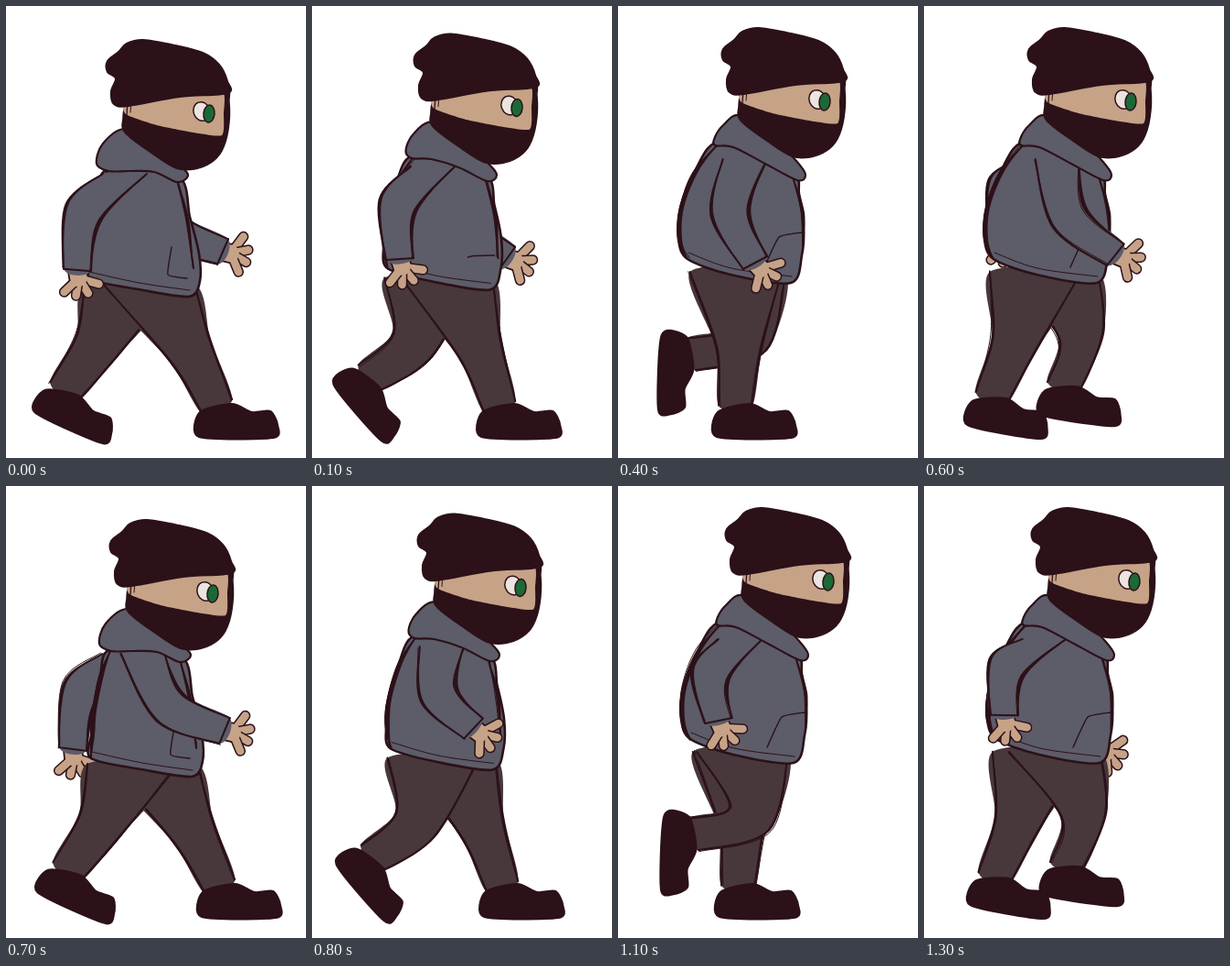
An HTML page with a canvas for the animation above (1.4 s loop, 328x493 px).

```html
<!DOCTYPE html>
<html lang="en">
<head>
<meta charset="utf-8">
<title>Walk cycle</title>
<style>
html, body { margin: 0; width: 100%; height: 100%; overflow: hidden; background: #fff; }
canvas { display: block; width: 328px; height: 493px; }
</style>
</head>
<body>
<canvas id="stage"></canvas>
<script>
const W = 328, H = 493, STEP = 100, COUNT = 14, HALF = COUNT / 2;
const DARK = '#2c1118', COAT = '#5d5c69', PANTS = '#48383b', SKIN = '#c6a287', GREEN = '#1b6936';
const canvas = document.getElementById('stage'), g = canvas.getContext('2d');
const ratio = window.devicePixelRatio || 1;
canvas.width = W * ratio;
canvas.height = H * ratio;

// ---- helpers ----
const rad = deg => deg * Math.PI / 180;
const pts = s => s.split(' ').map(p => p.split(',').map(Number));
const lerp = (a, b, u) => a.map((v, i) => v + (b[i] - v) * u);
const mix = (p, q, u) => p.map((v, i) => lerp(v, q[i], u));
const move = (p, dx, dy) => p.map(([x, y]) => [x + dx, y + dy]);

// Looping linear track through "step: values" keys.
function track(keys) {
  const steps = Object.keys(keys).map(Number);
  return t => {
    t %= COUNT;
    const a = steps.filter(s => s <= t).pop();
    const b = steps.find(s => s > t) ?? COUNT;
    return lerp(keys[a], keys[b % COUNT], (t - a) / (b - a));
  };
}

let seed = 1;
function random() {
  seed = (seed * 16807) % 2147483647;
  return seed / 2147483647;
}

// ---- motion ----
// Ankle x, y and foot tilt: planted for six steps, then lifted and swung forward.
const ankleAt = track({
  0: [231, 437, 0], 4: [128, 437, 0], 6: [73, 428, 10], 7: [63, 421, 24],
  9: [60, 391, 74], 11: [80, 380, 92], 13: [152, 416, 8]
});
const nearWrist = track({
  0: [78, 288], 2: [114, 264], 4: [150, 280], 7: [239, 267], 9: [114, 262], 11: [110, 256], 13: [88, 250]
});
const farWrist = track({
  0: [237, 268], 2: [190, 282], 4: [130, 262], 6: [86, 252], 7: [73, 287], 9: [191, 282], 11: [150, 262], 13: [191, 286]
});

// ---- shapes: leaning into the stride, and upright ----
const TORSO = [
  pts('112,178 100,206 92,245 90,272 90,297 145,309 200,317 212,300 211,270 201,230 188,185'),
  pts('112,148 84,180 68,220 66,254 76,276 123,293 189,302 201,272 203,238 198,205 190,181')
];
const HOOD = [
  pts('112,180 99,172 106,150 130,134 160,150 190,174 199,185 187,192 162,181 135,180'),
  pts('106,152 106,143 115,130 133,119 166,140 195,169 205,184 196,190 161,172 126,154')
];
const ZIP = [pts('186,184 197,232 205,286'), pts('191,186 201,225 202,264')];
const POCKET = [pts('181,263 177,293 198,297'), pts('160,285 176,252 201,247')];
const HAT = pts('118,107 115,93 120,79 111,72 111,60 123,50 132,41 150,37 185,43 215,51 233,64 242,82 242,95 190,99 134,109');
const MASK = pts('130,108 134,96 180,80 238,86 244,105 243,135 236,158 224,171 206,178 186,177 160,161 130,138 128,122');
const FACE = pts('131,103 185,93 236,92 238,118 236,141 205,138 165,130 131,118');
const SHOE = pts('-20,33 -19,6 16,-3 38,6 58,5 66,20 61,34');

// ---- drawing ----
// Smooth curve through points; a larger k gives tighter corners.
function trace(p, closed, k = 6) {
  const n = p.length, at = i => closed ? p[(i + n) % n] : p[Math.max(0, Math.min(n - 1, i))];
  g.moveTo(...p[0]);
  for (let i = 0; i < (closed ? n : n - 1); i++) {
    const [a, b, c, d] = [at(i - 1), at(i), at(i + 1), at(i + 2)];
    g.bezierCurveTo(b[0] + (c[0] - a[0]) / k, b[1] + (c[1] - a[1]) / k,
      c[0] - (d[0] - b[0]) / k, c[1] - (d[1] - b[1]) / k, ...c);
  }
}

function line(p, w = 2, color = DARK, closed = false, k = 6) {
  g.beginPath();
  trace(p, closed, k);
  g.strokeStyle = color;
  g.lineWidth = w;
  g.stroke();
}

function shape(p, color, w = 2.2, k = 7) {
  g.beginPath();
  trace(p, true, k);
  g.fillStyle = color;
  g.fill();
  if (w) line(p, w, DARK, true, k);
}

// Line that swells in the middle, with a loose second pass.
function brush(p, w) {
  const last = p.length - 1;
  const back = p.map(([x, y], i) => [x + (i && i < last ? w : 0), y]).reverse();
  g.beginPath();
  trace(p);
  g.lineTo(...back[0]);
  trace(back);
  g.fillStyle = DARK;
  g.fill();
  line(p, 2);
  line(p.map(([x, y]) => [x + random() * 4 - 2, y + random() * 4 - 2]), 1);
}

// Back and front edges of a limb through three joints, starting straight down.
function edges([a, b, c], widths) {
  const dirs = [[0, 1], [c[0] - a[0], c[1] - a[1]], [c[0] - b[0], c[1] - b[1]]];
  const side = s => [a, b, c].map(([x, y], i) => {
    const [dx, dy] = dirs[i], r = s * widths[i] / Math.hypot(dx, dy);
    return [x - dy * r, y + dx * r];
  });
  return [side(1), side(-1)];
}

// Joint between a and b, at fraction u and pushed sideways.
function joint(a, b, u, push) {
  const dx = b[0] - a[0], dy = b[1] - a[1], d = Math.hypot(dx, dy);
  return [a[0] + dx * u + dy / d * push, a[1] + dy * u - dx / d * push];
}

function leg(phase, lean) {
  const [x, y, tilt] = ankleAt(phase);
  const center = lerp([131, 290], [146, 303], lean);
  const hip = [center[0] + 10 * Math.cos(phase / COUNT * Math.PI * 2), center[1]];
  const half = Math.hypot(x - hip[0], y - hip[1]) / 2;
  const bend = Math.sqrt(Math.max(16, 68 ** 2 - half ** 2));
  const [back, front] = edges([hip, joint(hip, [x, y], .56, bend), [x, y]], [50, 25, 18]);
  shape([...back, ...front.reverse()], PANTS, 0, 8);
  brush(back, 2);
  brush(front, -2);
  g.save();
  g.translate(x, y);
  g.rotate(rad(tilt));
  shape(SHOE, DARK, 2, 8);
  g.restore();
}

// The fingers fan out, pointing down behind the body and ahead in front of it.
function hand([x, y]) {
  const aim = Math.max(12, 80 - .45 * (x - 80));
  const reach = (deg, r) => [x + r * Math.cos(rad(deg)), y + r * Math.sin(rad(deg))];
  const palm = reach(aim, 9);
  line([[x, y], palm], 22);
  for (const spread of [-48, -16, 12, 40]) {
    const finger = [palm, reach(aim + spread, 28)];
    line(finger, 11.5);
    line(finger, 8.5, SKIN);
  }
  line([[x, y], palm], 18.5, SKIN);
}

function arm(wrist, lean) {
  const shoulder = [135 + .12 * (wrist[0] - 120), 167 + 16 * lean];
  const [back, front] = edges([shoulder, joint(shoulder, wrist, .5, -23), wrist], [24, 20, 15]);
  hand(wrist);
  shape([...back, ...[...front].reverse()], COAT, 0, 8);
  brush(back, 3);
  brush(front, 4);
  line([back[2], front[2]], 2);
}

function ellipse(x, y, rx, ry, tilt, color) {
  g.beginPath();
  g.ellipse(x, y, rx, ry, tilt, 0, Math.PI * 2);
  g.fillStyle = color;
  g.fill();
  g.strokeStyle = DARK;
  g.lineWidth = 1.5;
  g.stroke();
}

function head(dx, dy) {
  g.save();
  g.translate(dx, dy);
  shape(MASK, DARK, 1.5, 6);
  shape(FACE, SKIN, 0, 10);
  ellipse(214, 115, 9, 10.5, -.35, '#ece4df');
  ellipse(222, 117.5, 6, 9.5, .1, GREEN);
  shape(HAT, DARK, 2, 6);
  line([[133, 104], [132, 119]], 1.3);
  line([[137, 104], [136, 116]], 1);
  g.restore();
}

function draw(i) {
  seed = 97 + i * 31;
  const beat = i % HALF;
  const lean = Math.max(0, 1 - beat / 2);
  const second = i >= HALF ? 1 : 0;
  const pose = ([low, high]) => move(mix(high, low, lean), 3 * second, 0);

  g.setTransform(ratio, 0, 0, ratio, 0, 0);
  g.fillStyle = '#fff';
  g.fillRect(0, 0, W, H);
  g.lineCap = g.lineJoin = 'round';

  arm(farWrist(i), lean);
  g.save();
  g.translate(3 * second, 0);
  leg(i + HALF, lean);
  leg(i, lean);
  g.restore();

  const torso = pose(TORSO);
  shape(torso, COAT, 2.6);
  brush(torso.slice(0, 5), 4);
  line(move(torso.slice(4, 7), 1, -7), 1);
  brush(pose(ZIP), 3);
  line(pose(POCKET), 1.4, DARK, false, 14);

  arm(nearWrist(i), lean);
  shape(pose(HOOD), COAT, 2.2, 6);
  head(4 * (1 - lean) + 4 * second, -13 * (1 - lean));
}

let shown = -1;
function tick() {
  const i = Math.floor(performance.now() / STEP) % COUNT;
  if (i !== shown) draw(shown = i);
  requestAnimationFrame(tick);
}
tick();
</script>
</body>
</html>
```
